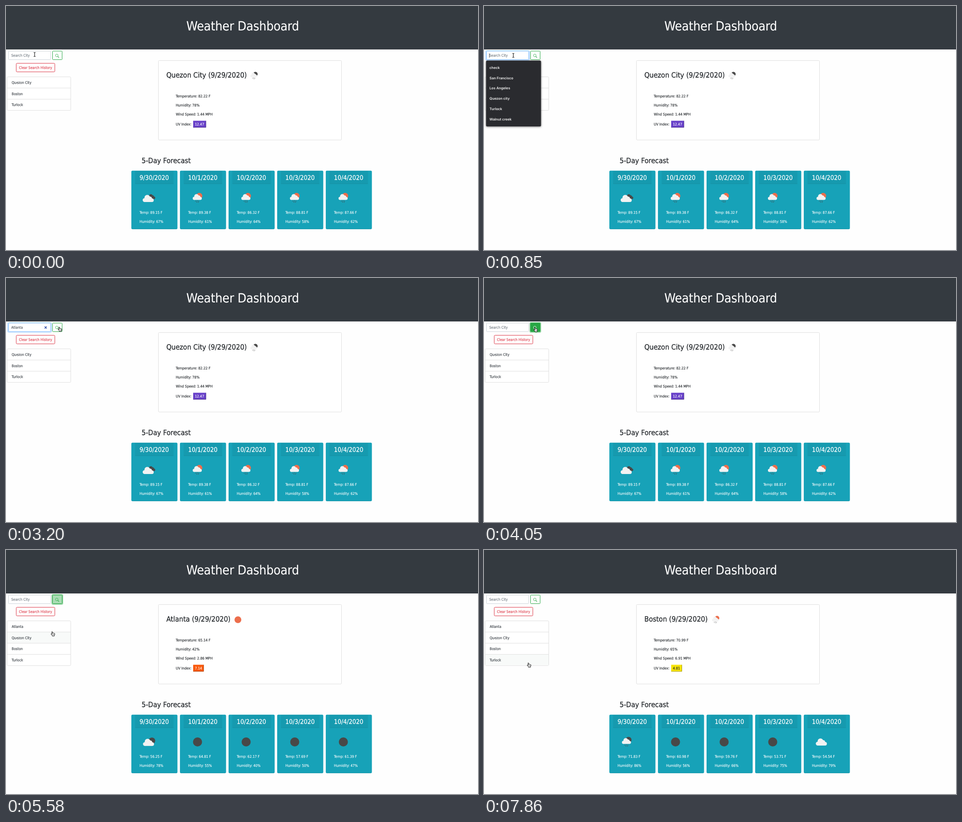
Animation of 1039 by 539 pixels, one loop 8 s. Source, as an HTML page:

```html
<!DOCTYPE html>
<html lang="en">
<head>
<meta charset="utf-8">
<title>Weather Dashboard</title>
<style>
  html, body { margin: 0; width: 100%; height: 100%; overflow: hidden; background: #fff; }
  svg { display: block; width: 1039px; height: 539px; }
  text {
    font: 8px "DejaVu Sans Condensed", "Noto Sans", sans-serif;
    letter-spacing: -.005em; white-space: pre; text-rendering: geometricPrecision;
    stroke: currentColor; stroke-width: .12px;
  }
  .head { letter-spacing: 0; stroke-width: .25px; }
  .menu text { font: 600 7.7px Inter, sans-serif; letter-spacing: 0; stroke: none; }
</style>
</head>
<body>
<svg id="stage" viewBox="0 0 1039 539"></svg>
<script>
const LOOP = 8000;
const INK = '#212529', TEAL = '#17a2b8', GREEN = '#28a745', SUN = '#ec6e4c', NIGHT = '#484848';

const rect = (x, y, w, h, fill, extra = '') =>
  `<rect x="${x}" y="${y}" width="${w}" height="${h}" fill="${fill}" ${extra}/>`;
const box = (x, y, w, h, stroke, fill = '#fff', r = 2) =>
  rect(x, y, w, h, fill, `stroke="${stroke}" rx="${r}"`);
const text = (x, y, str, fill = INK, size = 8, cls = '') =>
  `<text class="${cls}" x="${x}" y="${y}" fill="${fill}" style="color:${fill};font-size:${size}px">${str}</text>`;
const head = (x, y, str, fill, size) => text(x, y, str, fill, size, 'head');
const disc = (x, y, r, fill) => `<circle cx="${x}" cy="${y}" r="${r}" fill="${fill}"/>`;
const line = (d, stroke, width = 1) =>
  `<path d="${d}" fill="none" stroke="${stroke}" stroke-width="${width}"/>`;
const place = (x, y, s, body) => `<g transform="translate(${x} ${y}) scale(${s})">${body}</g>`;

// Weather icons, centred on the origin
const cloud = (fill = '#f2f2f2') =>
  disc(-8, 3.8, 4.2, fill) + disc(-2, -1.6, 6.2, fill) + disc(4, .4, 4.4, fill) +
  disc(8.2, 4, 4, fill) + rect(-8, 0, 16, 8, fill);
const drops = line('M-4 6.2l-.6 1.4M-.6 5.4l-.5 1.3M2.8 6.2l-.6 1.4M-1.4 8.3l-.6 1.4M2 8.8l-.6 1.2', NIGHT, 1.3);
const rain = ball => disc(4, -4.6, 6.6, ball) + place(-.6, -2.2, .82, cloud()) + drops;
const icons = {
  clouds: place(6, -3, .68, cloud(NIGHT)) + place(-1.2, 1, 1, cloud()),
  few: disc(7, -2.6, 7.2, NIGHT) + place(-.5, .8, 1, cloud()),
  cloud: cloud(),
  rainDay: rain(SUN),
  rainNight: rain(NIGHT),
  sun: disc(0, 0, 10, SUN),
  night: disc(0, 0, 10, NIGHT)
};

const cursors = {
  beam: line('M-2.2-4.5Q0-4.5 0-3.4Q0-4.5 2.2-4.5M0-4V4M-2.2 4.5Q0 4.5 0 3.4Q0 4.5 2.2 4.5', '#111', 1.1),
  arrow: '<path d="M0 0V10L2.4 7.8L4 11.4L5.6 10.7L4 7.2H7Z" fill="#000" stroke="#fff" stroke-width=".7"/>',
  hand: '<path d="M-2.3-4.2Q-1.5-5.4-.7-4.2L0-1.3L1.4-1.6L2.8-1.1L4.2-.4Q4.7 2 3.4 3.4V5H-1.1V4L-3.9.7Q-3.8-.6-2.6 0L-1.4 1Z" fill="#fff" stroke="#111" stroke-width="1"/>' +
    line('M.4 1v2M1.7 1v2M2.9 1v2', '#111', .5)
};

// Searched cities: current readings and five-day outlook
const cities = {
  quezon: {
    title: 'Quezon City', icon: ['rainNight', 546, 154], now: ['82.22', 78, '1.44'], uv: ['12.47', '#6841c9', '#fff', 28],
    temps: ['89.15', '89.38', '86.32', '88.81', '87.66'], hum: [67, 61, 64, 58, 62],
    days: ['clouds', 'rainDay', 'rainDay', 'rainDay', 'rainDay']
  },
  atlanta: {
    title: 'Atlanta', icon: ['sun', 510.5, 154], now: ['65.14', 42, '2.86'], uv: ['7.14', '#f9580a', '#fff', 23],
    temps: ['56.25', '64.81', '62.17', '57.69', '61.39'], hum: [78, 55, 40, 50, 47],
    days: ['few', 'night', 'night', 'night', 'night']
  },
  boston: {
    title: 'Boston', icon: ['rainDay', 510, 154], now: ['70.99', 65, '6.91'], uv: ['4.81', '#f7e40a', INK, 23.5],
    temps: ['71.83', '60.98', '59.76', '53.71', '54.54'], hum: [86, 56, 66, 75, 79],
    days: ['rainNight', 'night', 'night', 'night', 'cloud']
  }
};
const dates = ['9/30', '10/1', '10/2', '10/3', '10/4'];
const hints = ['check', 'San Francisco', 'Los Angeles', 'Quezon city', 'Turlock', 'Walnut creek'];

// Each step changes part of the state and holds until the next
const steps = [
  [0, { city: 'quezon', uv: 'quezon', first: 'clouds', list: ['Quezon City', 'Boston', 'Turlock'],
        typed: '', fill: 0, cur: ['beam', 63, 107] }],
  [310, { cur: ['beam', 63.5, 108] }],
  [580, { cur: ['beam', 64.5, 109] }],
  [850, { focus: 1, caret: 1, menu: 1 }],
  [1300, { typed: 'A', menu: 0 }],
  [1720, { typed: 'At' }],
  [1930, { typed: 'Atl' }],
  [2140, { typed: 'Atla' }],
  [2350, { typed: 'Atlan' }],
  [2550, { typed: 'Atlant' }],
  [2750, { typed: 'Atlanta', cur: ['arrow', 127, 109] }],
  [2990, { caret: 0, cur: ['hand', 120, 113] }],
  [3200, { cur: ['hand', 118.5, 113] }],
  [3500, { caret: 1, fill: .6, cur: ['hand', 114, 114] }],
  [3730, { caret: 0, fill: 1, cur: ['hand', 113.5, 114] }],
  [4050, { typed: '', focus: 0, ring: 1 }],
  [4530, { city: 'atlanta' }],
  [4740, { first: 'few', list: ['Atlanta', 'Quezon City', 'Boston', 'Turlock'] }],
  [4980, { uv: 'atlanta' }],
  [5580, { fill: .4, cur: ['hand', 103, 185], hover: 1 }],
  [5820, { fill: .1, cur: ['hand', 99.5, 200] }],
  [6180, { fill: 0, cur: ['hand', 99.5, 217], hover: 2 }],
  [6890, { ring: 0, picked: 1 }],
  [7390, { city: 'boston', first: 'rainNight', picked: 0 }],
  [7620, { uv: 'boston', cur: ['hand', 99.5, 235], hover: 3 }],
  [7860, { cur: ['hand', 99, 254] }]
];
let last = {};
const states = steps.map(([, change]) => last = { ...last, ...change });

function search(s) {
  let out = s.focus ? rect(4, 99, 96, 20.5, 'none', 'stroke="#bfdeff" stroke-width="2" rx="2"') : '';
  out += box(5.5, 99.5, 93, 19, s.focus ? '#80bdff' : '#ced4da', '#fff', 1);
  out += s.typed ? text(11.5, 112.3, s.typed, '#495057') : text(11.5, 112.3, 'Search City', '#6c757d');
  if (s.typed) out += line('M85 107l4.6 4.8M89.6 107l-4.6 4.8', '#2b4ba8', 1.4);
  if (s.caret) {
    const ends = [11.8, 17, 19.8, 21.5, 25.8, 30.2, 33, 37.2];
    out += line(`M${ends[s.typed.length]} 104.5v9.5`, '#333', .8);
  }
  if (s.ring) out += rect(101.2, 98.5, 23.6, 21.2, 'none', 'stroke="#94d3a2" stroke-width="2" rx="2"');
  out += box(102.5, 99.5, 21, 19, GREEN, '#fff', 1);
  out += rect(102.5, 99.5, 21, 19, GREEN, `opacity="${s.fill}"`);
  const lens = s.fill > .5 ? '#fff' : GREEN;
  out += `<circle cx="111.8" cy="109.2" r="2.9" fill="none" stroke="${lens}" stroke-width=".8"/>` +
    line('M114 111.4l2.6 2.6', lens, 1.1);
  return out + box(22.5, 126.5, 85, 19, '#dc3545') + text(28.5, 138.6, 'Clear Search History', '#dc3545');
}

function history(s) {
  const row = 24.7, top = 156.5;
  let out = box(2.5, top, 140, row * s.list.length, '#dfdfdf');
  s.list.forEach((name, i) => {
    const y = top + i * row;
    if (s.hover === i) out += rect(3, y + .5, 139, row - 1, '#f8faf9');
    if (i) out += line(`M2.5 ${y}h140`, '#dfdfdf');
    out += text(12.5, y + 15.5, name, '#343a40');
  });
  if (s.picked) out += rect(2, top + 2 * row, 141.3, row, 'none', 'stroke="#9a52a8" stroke-width="1.3" rx="1"');
  return out;
}

function menu() {
  return '<g class="menu">' +
    rect(4.5, 120.5, 121, 145.5, '#2a2b2f', 'rx="2.5" style="filter:drop-shadow(0 1px 2px #0008)"') +
    hints.map((h, i) => text(12, 139 + i * 22.7, h, '#f4f4f4', 7.7)).join('') + '</g>';
}

function current(s) {
  const c = cities[s.city], [label, fill, ink, w] = cities[s.uv].uv, [icon, x, y] = c.icon;
  return box(335.5, 120.5, 403, 175.5, '#dfdfdf') +
    head(353, 158, `${c.title} (9/29/2020)`, INK, 16) +
    place(x, y, .75, icons[icon]) +
    text(373.7, 201.6, `Temperature: ${c.now[0]} F`) +
    text(373.7, 221.8, `Humidity: ${c.now[1]}%`) +
    text(373.7, 242, `Wind Speed: ${c.now[2]} MPH`) +
    text(373.7, 263.8, 'UV Index:') +
    rect(412, 253.5, w + .4, 15, fill) +
    line(`M412 268h${w}v-14.5`, '#0005') +
    text(415.8, 263.6, label, ink);
}

function forecast(s) {
  const c = cities[s.city];
  return head(298.5, 346.5, '5-Day Forecast', INK, 16) + dates.map((d, i) => {
    const x = 275.9 + i * 107, icon = i ? c.days[i] : s.first;
    return rect(x, 363.8, 101.5, 129.2, TEAL, 'rx="2.5"') +
      line(`M${x + 2} 492.6h97.4`, '#1591a5', .8) +
      rect(x + 8.3, 364, 84.5, 29, '#0000000d') +
      line(`M${x + 8.3} 392.7h84.5`, '#00000018', .8) +
      head(x + 18, 384, d + '/2020', '#fff', 14) +
      place(x + (i ? 38.7 : 38.3), 424, 1, icons[icon]) +
      text(x + 18.2, 459, `Temp: ${c.temps[i]} F`, '#fff') +
      text(x + 18.2, 479, `Humidity: ${c.hum[i]}%`, '#fff');
  }).join('');
}

function draw(s) {
  const [kind, x, y] = s.cur;
  return rect(0, 0, 1039, 539, '#fefefe') +
    rect(0, 0, 1039, 96, '#343a40') +
    text(397, 53.5, 'Weather Dashboard', '#fff', 28) +
    search(s) + history(s) + current(s) + forecast(s) +
    (s.menu ? menu() : '') + place(x, y, 1, cursors[kind]);
}

const stage = document.getElementById('stage');
let shown = -1;
function tick(now) {
  const t = now % LOOP;
  const i = steps.findLastIndex(([at]) => at <= t);
  if (i !== shown) stage.innerHTML = draw(states[shown = i]);
  requestAnimationFrame(tick);
}
tick(0);
requestAnimationFrame(tick);
</script>
</body>
</html>
```
